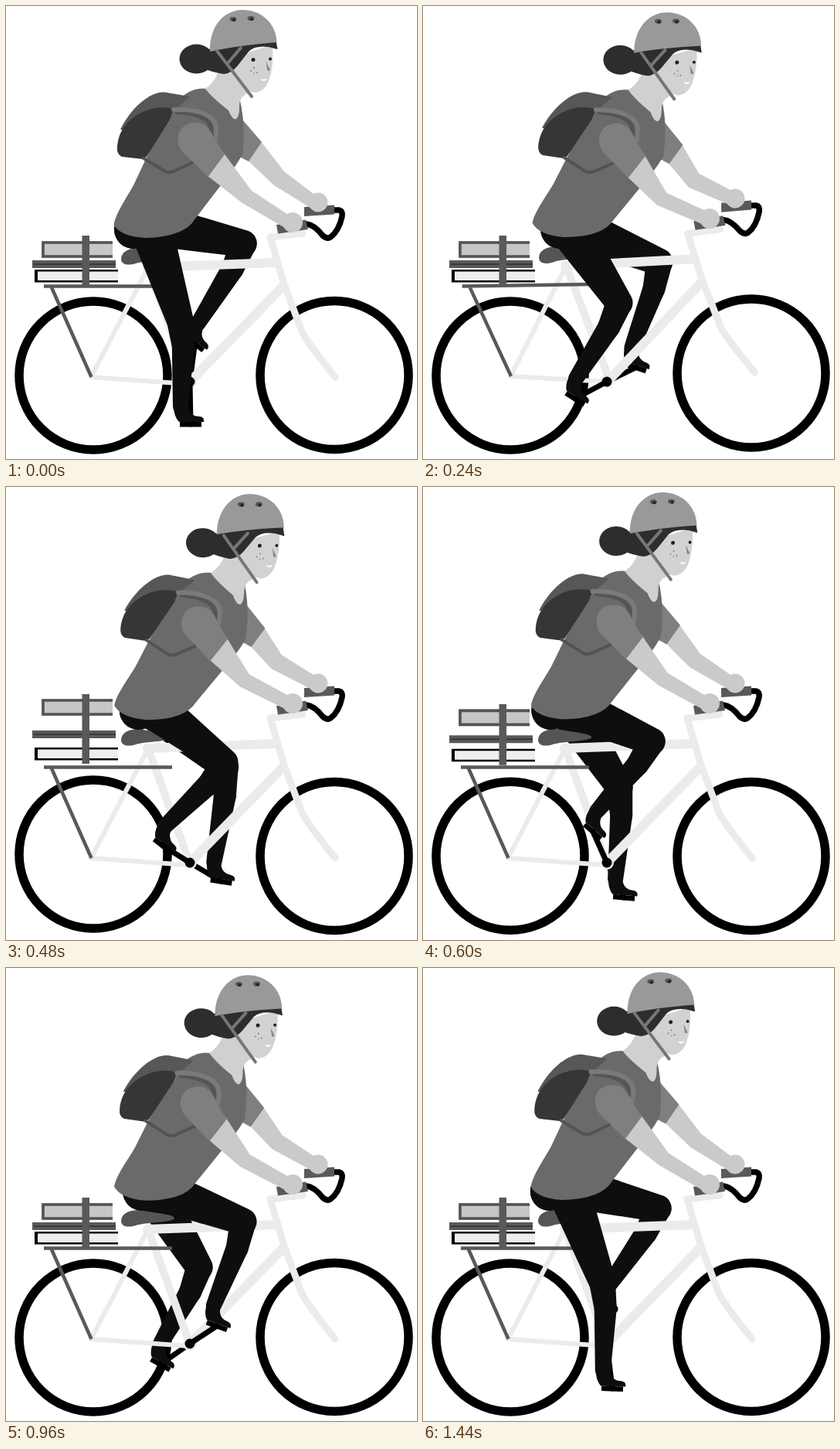
An HTML page that plays this animation: 532x586 px, repeating every 1500 ms.

```html
<!DOCTYPE html>
<html lang="en">
<head>
<meta charset="utf-8">
<title>Cyclist</title>
<style>
  html, body { margin: 0; width: 100%; height: 100%; overflow: hidden; background: #fff; }
  svg { display: block; width: 532px; height: 586px; }
  .line { fill: none; stroke-linecap: round; stroke-linejoin: round; }
  .tube { stroke: #ebebeb; }
  .skin { fill: #cacaca; }
  .shirt { fill: #6a6a6a; }
  .sleeve { fill: #7f7f7f; }
  .metal { fill: #595959; }
  .hair { fill: #2d2d2d; }
  .trousers { fill: #0e0e0e; }
  .wheel { fill: none; stroke: #000; stroke-width: 11.5; }
</style>
</head>
<body>
<svg viewBox="0 0 532 586">
  <circle id="rear" class="wheel" cx="113" cy="478" r="96"/>
  <circle id="front" class="wheel" cx="425" cy="477.5" r="96"/>

  <g id="farLeg"></g>

  <g id="bike">
    <g class="line tube">
      <path stroke-width="6" d="M183 340L110 480L236 489"/>
      <path stroke-width="12" d="M183 338L350 332M358 363L240 484"/>
      <path stroke-width="10" d="M185 341L237 484"/>
      <path stroke-width="9" d="M384 294L342 299L360 360L383 421Q389 434 426 480"/>
    </g>
    <path fill="none" stroke="#595959" stroke-width="4.5" d="M49 362.5H215M58.500 363L110.500 480"/>
    <path fill="#555" d="M149 328C149 318 158 313 174 313C195 318 218 318 218 324C216 329 180 329 168 333C158 336 150 335 149 328Z"/>
    <path class="line" stroke="#000" stroke-width="7.5" d="M424 264L431 264Q436 265 435 272Q431 291 420 299Q416 302 410 297Q399 283 389 282"/>
    <path class="metal" d="M386 260L425 257.500V269.500L386 272ZM350 283L388 276.500L391 289L352 294.500Z"/>
  </g>

  <g id="bookA">
    <path fill="#c6c6c6" d="M46 304H138V326H46Z"/>
    <path fill="none" stroke="#535353" stroke-width="3.600" d="M138 306H48V324H138"/>
  </g>
  <g id="bookB">
    <path class="metal" d="M34 329H142V339H34Z"/>
    <path stroke="#303030" stroke-width="1.500" d="M36 334H142"/>
  </g>
  <g id="bookC">
    <path d="M37 341H145V357.500H37Z"/>
    <path fill="#eee" d="M41 343.500H145V355H41Z"/>
  </g>
  <rect id="band" class="metal" x="98.500" width="9.500"/>

  <circle cx="238" cy="486" r="9" fill="#ebebeb"/>
  <g id="nearLeg"></g>

  <path id="farArm" class="skin"/>
  <circle id="farHand" class="skin" cx="404" cy="254" r="12.500"/>

  <g class="lean">
    <path class="sleeve" d="M306 147L331 176L314 201L300 194Z"/>
    <path class="shirt" d="M139.500 283C142 268 155 250 165 232L180 200L213 135C222 122 236 105 258 107L302 118Q311 155 306 192Q295 212 275 236L245 275Q231 299 180 300Q148 298 139.500 283Z"/>
    <path fill="#575757" d="M148 160C156 142 180 111 205 111.500L238 117L217 136L190 160Z"/>
    <path fill="#363636" d="M144 182C146 160 158 147 175 138Q195 128 217 133L212 147L182 195L177 198L150 195Q143 192 144 182Z"/>
    <path class="line" stroke="#535353" stroke-width="4" d="M178 197L206 214Q212 217 219 213L242 202"/>
    <path class="line" stroke="#555" stroke-width="6" d="M222 137Q248 138 260 148Q268 156 267 172"/>
    <path class="line" stroke="#7a7a7a" stroke-width="6" d="M217 134C244 133 262 138 270 150Q273 157 271 172"/>
    <path fill="#d0d0d0" d="M276 80Q272 98 258 107Q266 118 288 135Q292 146 297 146.500Q302 145 302 132Q301 116 316 112L312 84Z"/>
    <path fill="#d2d2d2" d="M282 70L345 50Q347 78 340 97Q334 111 322 112Q308 110 290 85Z"/>
    <ellipse class="hair" cx="246.500" cy="68.500" rx="22" ry="19"/>
    <path class="hair" d="M255 61L271 51L349 42L351.500 56L340 53Q322 51 314 59L300 77Q292 87 282 88Q268 86 256 81Z"/>
    <path id="helmet" fill="#999" d="M264 59C263 23 285 5 306 5C332 5 350 24 350.500 47Q300 51 264 59Z"/>
    <path class="line" stroke="#777" stroke-width="4" d="M273 58L318 117M304 54L287 74"/>
    <g fill="#555">
      <ellipse cx="294" cy="17" rx="4.500" ry="3"/>
      <ellipse cx="317" cy="16" rx="4.500" ry="3"/>
    </g>
    <g fill="#222">
      <circle cx="295" cy="18" r="2"/>
      <circle cx="318" cy="17" r="2"/>
      <circle cx="320" cy="69.500" r="2.500"/>
      <circle cx="342" cy="68.500" r="2"/>
    </g>
    <path fill="#858585" d="M336.500 72L342 83L338.500 84Z"/>
    <g fill="#777">
      <circle cx="317" cy="84" r=".9"/><circle cx="321" cy="80" r=".9"/>
      <circle cx="325" cy="86" r=".9"/><circle cx="321" cy="87" r=".7"/>
    </g>
    <path class="line" stroke="#fff" stroke-width="2" d="M331 95Q334 97 336 95"/>
  </g>

  <path id="nearArm" class="skin"/>
  <g class="lean">
    <path class="sleeve" d="M222.500 174C222 156 236 150 248 151C260 152 266 163 270 172L283 192L261.500 221L232 192Q223 184 222.500 174Z"/>
  </g>
  <circle id="nearHand" class="skin" cx="371" cy="280" r="13"/>
</svg>

<script>
const LOOP = 1500, STEP = 60;
const HUB = [238, 486], HIP = [186, 282], PIVOT = [150, 300];
const LEAN = 2.58;
const $ = id => document.getElementById(id);
const leans = document.querySelectorAll('.lean');

// ms, knee x, knee y, pedal x, pedal y, foot angle
const ride = [
  [0, 225, 406, 239, 541, 0],
  [240, 254, 384, 197, 508, 32],
  [480, 283, 356, 203, 464, 38],
  [720, 306, 308, 240, 436, 40],
  [960, 307, 328, 273, 463, 20],
  [1200, 289, 357, 281, 505, 10],
  [1440, 232, 406, 245, 544, 2]
];

const row = i => {
  const n = ride.length, r = ride[(i + n) % n].slice();
  r[0] += Math.floor(i / n) * LOOP;
  return r;
};

// Periodic cubic through the rows
function pose(ms) {
  const t = ms % LOOP;
  let i = ride.length - 1;
  while (ride[i][0] > t) i--;
  const [a, b, c, d] = [-1, 0, 1, 2].map(k => row(i + k));
  const span = c[0] - b[0], u = (t - b[0]) / span, v = 1 - u;
  return b.map((p, k) => {
    const m0 = (c[k] - a[k]) / (c[0] - a[0]) * span;
    const m1 = (d[k] - b[k]) / (d[0] - b[0]) * span;
    return p * (1 + 2 * u) * v * v + m0 * u * v * v + c[k] * u * u * (3 - 2 * u) - m1 * u * u * v;
  }).slice(1);
}

const fix = n => n.toFixed(2);
const poly = pts => 'M' + pts.map(p => p.map(fix).join(' ')).join('L') + 'Z';

function rotate([x, y], deg, [cx, cy] = [0, 0]) {
  const a = deg * Math.PI / 180, c = Math.cos(a), s = Math.sin(a);
  return [cx + (x - cx) * c - (y - cy) * s, cy + (x - cx) * s + (y - cy) * c];
}

// Outline around two circles
function limb([ax, ay], ra, [bx, by], rb) {
  const dir = Math.atan2(by - ay, bx - ax);
  const w = Math.acos((ra - rb) / Math.hypot(bx - ax, by - ay));
  const at = (x, y, r, a) => `${fix(x + r * Math.cos(a))} ${fix(y + r * Math.sin(a))}`;
  return `M${at(ax, ay, ra, dir + w)}A${ra} ${ra} 0 1 1 ${at(ax, ay, ra, dir - w)}` +
    `L${at(bx, by, rb, dir - w)}A${rb} ${rb} 0 0 1 ${at(bx, by, rb, dir + w)}Z`;
}

// Point a third down the lower leg, pushed slightly forward
function shinBulge([kx, ky], [ax, ay]) {
  const dx = ax - kx, dy = ay - ky, n = 4 / Math.hypot(dx, dy);
  return [kx + dx * 0.3 + dy * n, ky + dy * 0.3 - dx * n];
}

function leg(ms, seat) {
  const [kx, ky, px, py, tilt] = pose(ms);
  const [ax, ay] = rotate([-13, -23], tilt);
  const knee = [kx, ky], ankle = [px + ax, py + ay];
  const shin = shinBulge(knee, ankle);
  return `<path class="line" stroke="#000" stroke-width="7" d="M${HUB}L${fix(px)} ${fix(py)}"/>
    <circle cx="${HUB[0]}" cy="${HUB[1]}" r="6.5"/>
    <g class="trousers">
      <circle cx="${fix(seat)}" cy="289" r="25"/>
      <path d="${limb(HIP, 28, knee, 17.5)}"/>
      <path d="${limb(knee, 17, shin, 14.5)}"/>
      <path d="${limb(shin, 14.5, ankle, 10)}"/>
    </g>
    <g transform="translate(${fix(px)} ${fix(py)}) rotate(${fix(tilt)})">
      <path class="trousers" d="M-15 -3H17Q18 -9 12 -10Q-2 -10 -4 -24H-22Q-22 -10 -15 -3Z"/>
      <rect x="-14" y="-3" width="28" height="6.500"/>
    </g>`;
}

const bump = (t, mid) => Math.abs(t - mid) < 180 ? Math.cos((t - mid) / 360 * Math.PI) ** 2 : 0;
const move = (id, y) => $(id).setAttribute('transform', `translate(0 ${fix(y)})`);

function draw(t) {
  const turn = t / LOOP * 2 * Math.PI;
  const sway = (1 - Math.cos(2 * turn)) / 2;
  const front = bump(t, 240), back = bump(t, 480);
  const hop = Math.max(0, 1 - ((t - 480) / 180) ** 2);
  const seat = 165 + 12 * Math.sin(turn) ** 2 + 4 * Math.sin(2 * turn);

  move('front', -2.5 * front);
  move('rear', -3 * back);
  move('bookA', -30 * hop);
  move('bookB', -14 * hop);
  move('bookC', -4 * hop);
  move('helmet', -2 * back);
  $('band').setAttribute('y', 297 - 29 * hop);
  $('band').setAttribute('height', 65 + 25 * hop);
  $('bike').setAttribute('transform', `rotate(${-0.9 * front} 50 258)`);

  $('farLeg').innerHTML = leg(t + LOOP / 2, seat);
  $('nearLeg').innerHTML = leg(t, seat);

  const lean = LEAN * sway, lift = -5 * front;
  const push = [1.5 * front, -2 * front];
  const body = p => rotate(p, lean, PIVOT).map((v, i) => v + push[i]);
  const elbow = (x, y) => [x - 4 * sway, y + 4 * sway];
  for (const g of leans) g.setAttribute('transform', `translate(${push}) rotate(${lean} ${PIVOT})`);
  $('farArm').setAttribute('d', poly([
    body([329, 174]), elbow(360, 214), [398, 243 + lift], [394, 261 + lift],
    elbow(347, 232), body([312, 199])
  ]));
  $('nearArm').setAttribute('d', poly([
    body([281, 189]), elbow(318, 239), [364, 269 + lift], [361, 287 + lift],
    elbow(306, 255), body([260, 219])
  ]));
  move('farHand', lift);
  move('nearHand', lift);
}

const begin = performance.now();
function tick() {
  const t = (performance.now() - begin) % LOOP;
  draw(Math.floor(t / STEP) * STEP);
  requestAnimationFrame(tick);
}
tick();
</script>
</body>
</html>
```
